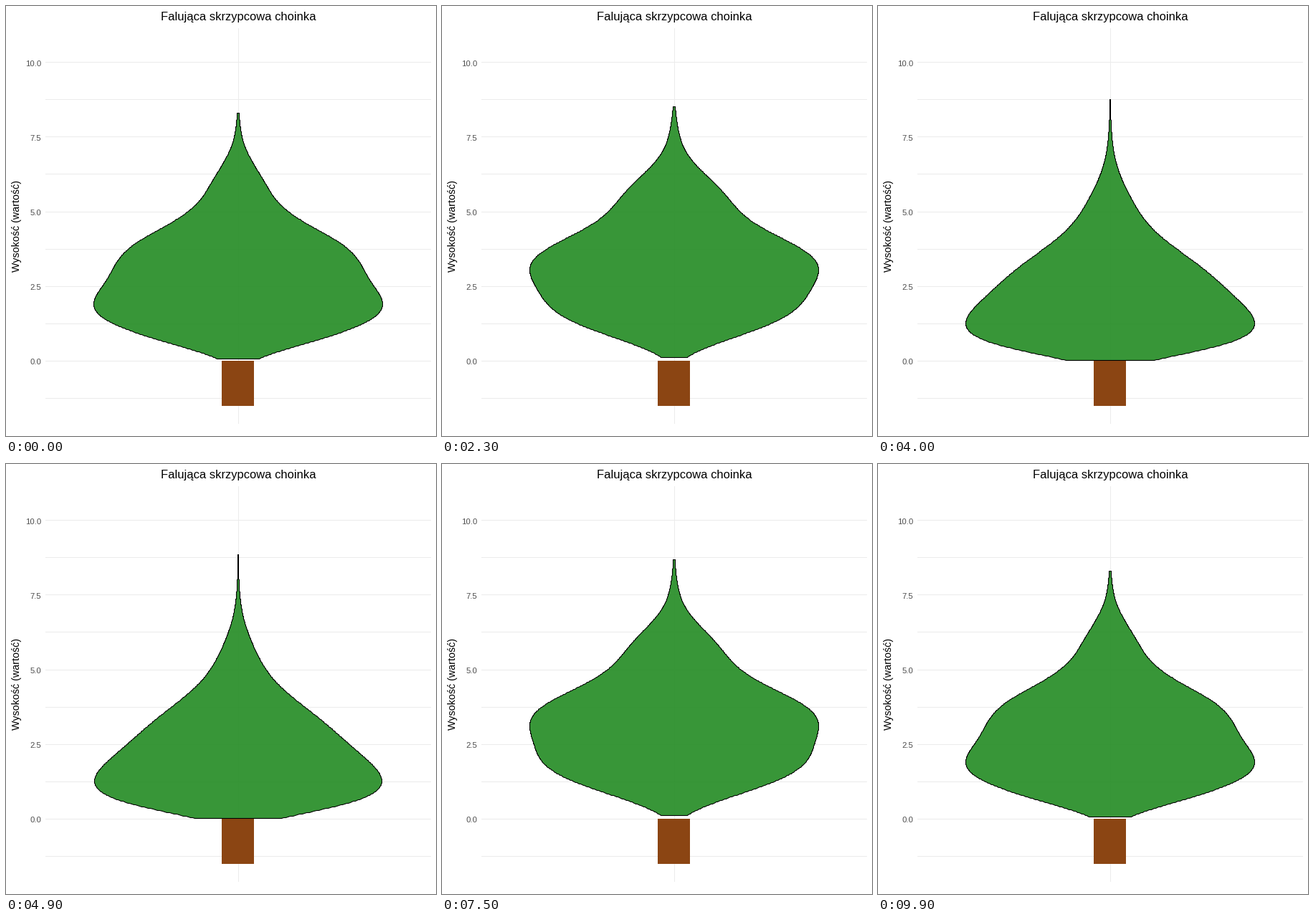
Write a matplotlib script that moves like this. It is 600 px wide and 600 px high and loops after 10 s.

```python
import matplotlib.pyplot as plt
import numpy as np
from matplotlib.animation import FuncAnimation
from matplotlib.patches import Polygon, Rectangle

plt.rcParams["font.family"] = "Liberation Sans"

PX = 0.72                     # points per pixel at 100 dpi
CX, HALF = 324, 201.5         # tree axis and widest half width
Y0, UNIT = 495.5, 41.7        # pixel row of value 0, pixels per unit
STATES, FRAMES = 40, 100

# the first states blend through one in-between, later ones switch directly
STARTS = np.r_[0, np.arange(2, 57, 3), 58, np.arange(61, FRAMES, 2)]
LAST_BLEND = 60

P = (np.arange(200) + 0.5) / 200
U = np.linspace(0, 1, 512)


def violin(i):
    """Values and half widths of a smoothed, rippled beta density."""
    turn = 2 * np.pi * i / STATES
    wave = np.sin(2 * turn)
    lo = 0.06 * np.exp(1.3 * wave)
    hi = 8.6 - 0.3 * np.cos(turn)
    v = lo + (hi - lo) * U
    density = P ** (1.2 + 0.65 * wave) * (1 - P) ** 4.5
    kernel = np.exp(-((v[:, None] - 10 * P) / 0.35) ** 2 / 2)
    ripple = np.cos(2 * np.pi * (v - 5.2) / 2.6 + 4.06 * i)
    w = kernel @ density * (1 - (0.01 + 0.015 * v) * ripple)
    return v, HALF * w / w.max()


SHAPES = np.array([violin(i) for i in range(STATES)])


def outline(k):
    i = np.searchsorted(STARTS, k, side="right") - 1
    v, w = SHAPES[i % STATES]
    if k <= LAST_BLEND and k + 1 in STARTS:
        v, w = (SHAPES[i] + SHAPES[i + 1]) / 2
    y = Y0 - UNIT * v
    path = np.c_[np.r_[CX - w, (CX + w)[::-1]], np.r_[y, y[::-1]]]
    return np.floor(path) + 0.5          # pixel centres keep the line crisp


fig = plt.figure(figsize=(6, 6), dpi=100, facecolor="white")
ax = fig.add_axes([0, 0, 1, 1])
ax.set(xlim=(0, 600), ylim=(600, 0))
ax.axis("off")


def grid(x, y):
    ax.plot(x, y, color="#EBEBEB", lw=PX, solid_capstyle="butt", snap=False,
            zorder=1)


for value in np.arange(-1.25, 10.1, 1.25):
    row = np.floor(Y0 - UNIT * value + 0.1) + 0.5
    grid([55, 593], [row, row])
    if value >= 0 and value % 2.5 == 0:
        ax.text(49, row + 5, f"{value:.1f}", size=11.2 * PX, color="#4D4D4D",
                ha="right", va="baseline")
grid([CX + 0.5, CX + 0.5], [31, 583])

ax.text(CX, 20, "Falująca skrzypcowa choinka", size=16.5 * PX,
        ha="center", va="baseline")
ax.text(19, 307, "Wysokość (wartość)", size=14.2 * PX, rotation=90,
        rotation_mode="anchor", ha="center", va="baseline")

ax.add_patch(Rectangle((301, 495), 45, 63, fc="#8B4513", ec="none", zorder=2))
tree = Polygon(outline(0), closed=True, fc=(34 / 255, 139 / 255, 34 / 255, 0.9),
               ec="black", lw=1.07 * PX, joinstyle="round", snap=False, zorder=3)
ax.add_patch(tree)


def draw(k):
    tree.set_xy(outline(k))
    return (tree,)


anim = FuncAnimation(fig, draw, frames=FRAMES, interval=100, repeat=True,
                     repeat_delay=0)
plt.show()
```
